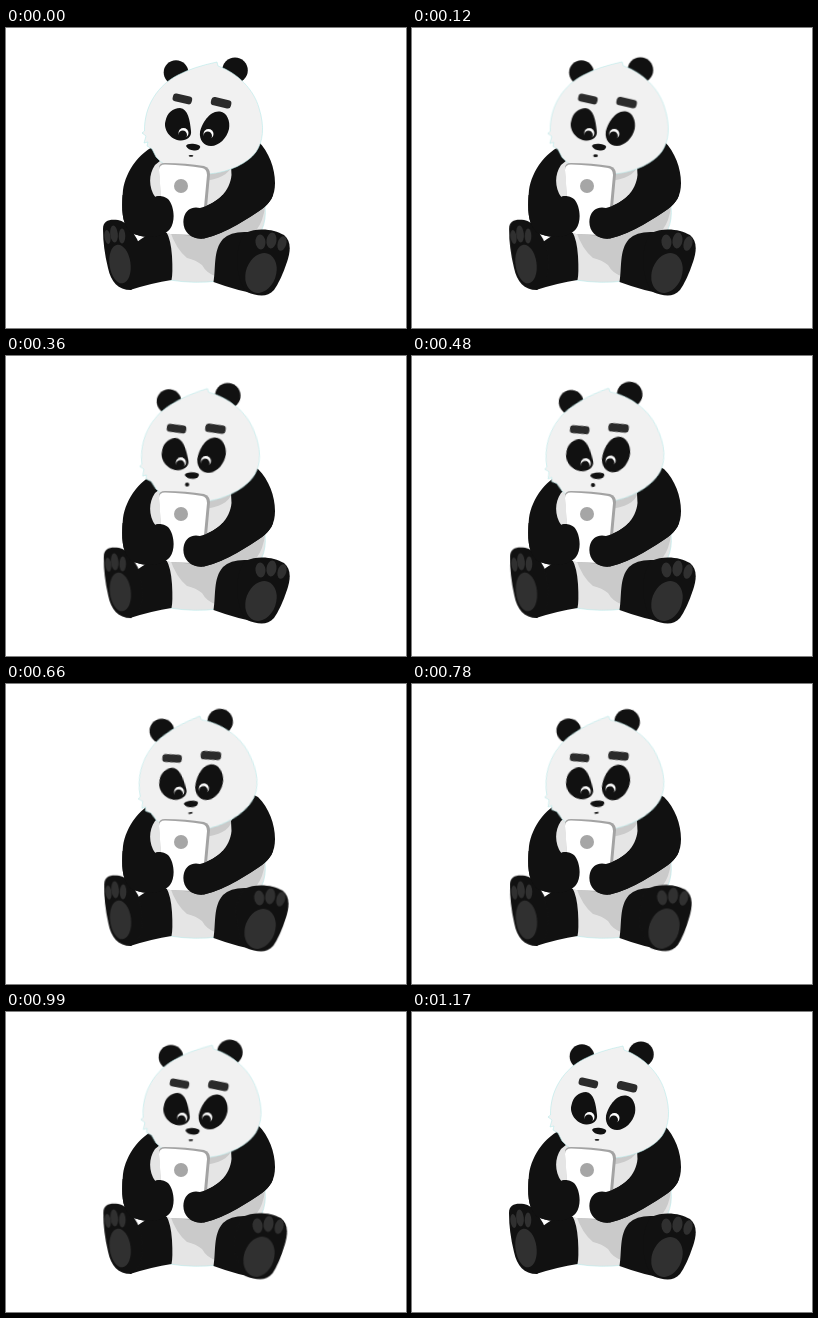
An HTML page for the animation above (1.2 s loop, 400x300 px).

```html
<!DOCTYPE html>
<html lang="en">
<head>
<meta charset="utf-8">
<title>Panda with tablet</title>
<style>
  html, body { margin: 0; width: 100%; height: 100%; overflow: hidden; background: #fff; }
  svg { display: block; width: 100vw; height: 100vh; }
  .ink { fill: #111; }
  .pad { fill: #303030; }
  .brow { fill: #2b2b2b; }
  .fur { fill: #f1f1f1; stroke: #b8eaea; stroke-width: .6; }
  .torso { fill: #e5e5e5; }
  .shade { fill: #cacaca; }
  .ears, .head, .mouth, .left-foot, .right-foot {
    animation: 1200ms cubic-bezier(.37, 0, .63, 1) infinite;
  }
  .ears { transform-origin: 183px 162px; animation-name: ears; }
  .head { transform-origin: 197px 132px; animation-name: head; }
  .mouth { transform-origin: 185px 128px; animation-name: mouth; }
  .left-foot { transform-origin: 125px 262px; animation-name: left-foot; }
  .right-foot { transform-origin: 245px 310px; animation-name: right-foot; }

  @keyframes ears {
    0%, 3%, 99.2%, 100% { transform: rotate(0deg); }
    58% { transform: rotate(-7deg); }
  }
  @keyframes head {
    0%, 3%, 98.3%, 100% { transform: translateY(0) rotate(0deg); }
    53.5% { transform: translateY(-1px) rotate(-10deg); }
  }
  @keyframes mouth {
    0%, 4%, 53%, 100% { transform: none; }
    18%, 41% { transform: translate(-3.5px, 0) scale(.9, 2.2); }
  }
  @keyframes left-foot {
    0%, 100% { transform: rotate(0deg); }
    52% { transform: rotate(1.2deg); }
  }
  @keyframes right-foot {
    0%, 47%, 96.5%, 100% { transform: rotate(0deg); }
    71% { transform: rotate(-3deg); }
  }
</style>
</head>
<body>
<svg viewBox="0 0 400 300">
  <defs>
    <clipPath id="low"><path d="M100 167H290V215H100Z"/></clipPath>
    <g id="arms" class="ink">
      <path d="M158 114 C134 121 120 143 117 162 C115 183 116 200 128 206 C144 212 158 208 164 201 C170 193 168 177 162 171 C158 168 153 167 149 169 C143 160 142 147 149 137 L160 128Z"/>
      <path d="M238 106 L252 113 C263 124 269 140 269 155 C269 168 264 175 256 181 C242 190 222 205 198 210.500 C183 212 175 201 178 189 C180 182 186 178 194 180 C212 175 224 163 225.500 147 L225 137 L232 126Z"/>
    </g>
    <g id="glint">
      <circle r="5" fill="#fff"/>
      <circle class="ink" cx="-.8" cy="1.9" r="4.300"/>
    </g>
  </defs>

  <!-- torso -->
  <path class="fur torso" d="M150 128 C140 145 140 165 150 178 L160 200 L164 252 Q188 256 212 253 L240 220 Q262 205 259 178 L253 140 L235 120Z"/>
  <path class="shade" d="M164 203 Q170 221 181 230 Q190 232 196 237 Q201 246 210 248 L230 215 Q256 208 259 178 L235 190 L205 205Z"/>
  <path class="shade" d="M198 138 L226 134 Q226 148 202 152.500Z"/>

  <!-- legs -->
  <path class="ink" d="M118 214 L131 214 Q140 207 152 202 L160 203 Q165 212 166 228 Q167 246 165.500 252 Q146 255 124 262Z"/>
  <g class="left-foot">
    <path class="ink" d="M97 201 C97 192 104 191 112 192 C122 194 126 203 131 211 C139 228 138 254 125 262 C112 262 105 254 102 240 Q97 220 97 201Z"/>
    <g class="pad">
      <ellipse cx="114" cy="236" rx="10.5" ry="19.5" transform="rotate(-8 114 236)"/>
      <ellipse cx="101.5" cy="209" rx="3" ry="7" transform="rotate(-8 101.5 209)"/>
      <ellipse cx="108" cy="206" rx="3.8" ry="8.5" transform="rotate(-6 108 206)"/>
      <ellipse cx="116" cy="208" rx="3.3" ry="7.5"/>
    </g>
  </g>
  <path class="ink" d="M207.500 254 C210 240 207 222 217 211 Q225 203 242 204 L254 208 L252 266 Q232 263 207.500 254Z"/>
  <g class="right-foot">
    <path class="ink" d="M239 205 C252 199 268 201 278 207 C285 213 285 222 281 234 Q275 252 268 262 C261 270 251 268 241 264 C231 255 226 222 239 205Z"/>
    <g class="pad">
      <ellipse cx="255" cy="245" rx="15" ry="20.5" transform="rotate(20 255 245)"/>
      <ellipse cx="254.500" cy="214" rx="5" ry="7.5" transform="rotate(-5 254.500 214)"/>
      <ellipse cx="265.500" cy="212.500" rx="5" ry="8" transform="rotate(8 265.500 212.500)"/>
      <ellipse cx="276" cy="215.500" rx="4.300" ry="7.5" transform="rotate(16 276 215.500)"/>
    </g>
  </g>

  <use href="#arms"/>

  <g class="ears ink">
    <circle cx="170" cy="44.500" r="12.3"/>
    <circle cx="229" cy="42.300" r="12.8"/>
  </g>

  <g class="head">
    <path class="fur" d="M211 34 L212 38 C232 45 248 62 253 80 C259 99 257 114 250 124 C242 135 224 144 203 146 C183 148 161 142 150 129 L146 121 L141 118 L142 114 L138 115 L140 108 L136 105 L138.500 103 C138 78 152 57 172 47 Q187 39 211 34Z"/>
    <rect class="brow" x="166.500" y="67" width="19.500" height="8" rx="3" transform="rotate(13 176.500 71.500)"/>
    <rect class="brow" x="204.800" y="70.500" width="20.500" height="8.500" rx="3.300" transform="rotate(13 215 75)"/>
    <g class="ink">
      <path d="M174 80 C182 81 184 92 185 103 C186 109 180 113 174 112.500 C164 111.500 157 101 159.500 93 C161 85 167 80 174 80Z"/>
      <path d="M214 83.500 C221 84.500 224.500 93 223 101 C221 110 213 118 205 118 C198 118 193 112 194 104 C196 95 204 82 214 83.500Z"/>
      <path d="M180 118 Q181 115.500 187 115.800 Q194 116.500 194.300 119 Q193 123 188 122.500 Q182 122 180 118Z"/>
      <ellipse class="mouth" cx="185" cy="127.800" rx="2.4" ry=".9"/>
    </g>
    <use href="#glint" x="177.500" y="105"/>
    <use href="#glint" x="202.500" y="106"/>
  </g>

  <!-- tablet -->
  <path fill="#a3a3a3" d="M153 140 Q153 135 159 135 Q180 135 198 138 Q204 140 204 146 L199 201 Q198 208 190 208 L164 206 Q158 205 157 199Z"/>
  <path fill="#fff" d="M153 142 Q153 136.500 159 136.500 Q180 137 196 140 Q201 141 201 147 L196 201 Q195 207 188 207 L164 206 Q158 205 157 199Z"/>
  <circle cx="175" cy="158" r="7" fill="#a6a6a6"/>

  <use href="#arms" clip-path="url(#low)"/>
</svg>
</body>
</html>
```
